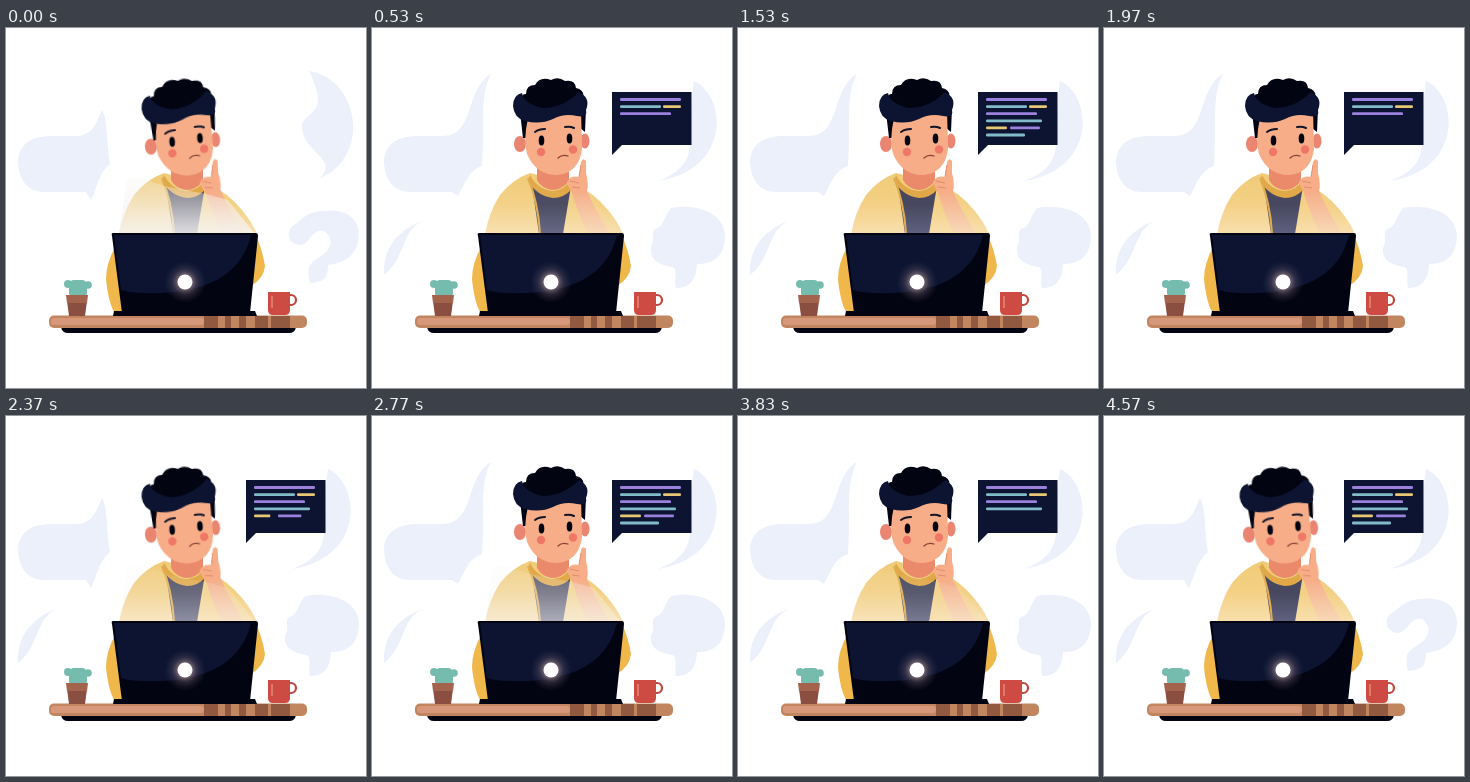
An HTML page for the animation above (4.76 s loop, 360 px wide and 360 px high).

```html
<!DOCTYPE html>
<html lang="en">
<head>
<meta charset="utf-8">
<title>Thinking at the laptop</title>
<style>
html, body { margin: 0; width: 100%; height: 100%; overflow: hidden; background: #fff; }
svg { display: block; width: 100vw; height: 100vh; }
.cloud { fill: #ecf0fa; }
.dark { fill: #030412; }
.navy { fill: #0c1431; }
.skin { fill: #f7ae88; }
.line { fill: none; stroke: #12142a; stroke-linecap: round; }
#head { transform-origin: 185px 147px; }
#hand { transform-origin: 208px 160px; }
#eyes { transform-origin: 183px 112px; }
#bubble { transform-origin: 241px 126px; }
</style>
</head>
<body>
<svg viewBox="0 0 360 360">
  <defs>
    <linearGradient id="coat" x1="0" y1="0" x2="0" y2="1">
      <stop offset="0" stop-color="#f0cb78"/>
      <stop offset=".5" stop-color="#f3d084"/>
      <stop offset="1" stop-color="#f8dfae"/>
    </linearGradient>
    <linearGradient id="shirt" x1="0" y1="0" x2="0" y2="1">
      <stop offset=".4" stop-color="#47485f"/>
      <stop offset="1" stop-color="#5f6280"/>
    </linearGradient>
    <linearGradient id="arm" x1="0" y1="0" x2="0" y2="1">
      <stop offset="0" stop-color="#f5ab86"/>
      <stop offset="1" stop-color="#f8d9b8"/>
    </linearGradient>
    <linearGradient id="fade" x1="0" y1="0" x2="0" y2="1">
      <stop offset="0" stop-color="#f4f2ef" stop-opacity=".25"/>
      <stop offset="1" stop-color="#f6f4f1" stop-opacity=".85"/>
    </linearGradient>
    <radialGradient id="glow">
      <stop offset=".3" stop-color="#b59a9c" stop-opacity=".7"/>
      <stop offset=".6" stop-color="#5f5263" stop-opacity=".4"/>
      <stop offset="1" stop-color="#39364f" stop-opacity="0"/>
    </radialGradient>
  </defs>

  <g class="cloud">
    <path id="talk"/>
    <path id="moon"/>
    <path id="query"/>
    <path id="leaf" d="M50 193C28 205 34 230 12 247C11 225 20 205 50 193Z"/>
  </g>

  <!-- body -->
  <path fill="#f0b74a" d="M109 219Q100 236 100 251Q102 273 108 284H118L114 219ZM248 204Q256 219 259 238Q258 250 245 258Z"/>
  <path fill="url(#coat)" d="M113 206Q117 184 128 167Q141 151 158 145L202 156Q221 164 236 182Q246 194 251 206Z"/>
  <path fill="url(#shirt)" d="M160 157Q180 174 199 158L191 206H167Z"/>
  <path fill="#e0a848" d="M158 147Q166 162 181 163Q193 162 199 152L200 161Q192 170 181 170Q165 168 156 153Z"/>
  <path fill="none" stroke="#e2ac50" stroke-width="2" d="M156 150Q166 174 168 205"/>
  <path fill="#ea8a6b" d="M165 136H197V153Q190 162 180 162Q169 160 165 152Z"/>
  <path fill="url(#arm)" d="M199 162L214 161Q222 180 238 206H216Q206 186 199 162Z"/>
  <path id="haze" fill="url(#fade)" d="M113 206L121 152Q131 146 141 152L158 158L200 166L222 172L249 206Z"/>

  <g id="head">
    <g fill="#e98570">
      <ellipse cx="148" cy="116" rx="6" ry="8"/>
      <ellipse cx="213" cy="113" rx="4.500" ry="7.500"/>
    </g>
    <path class="dark" d="M148 84H168L157 100L156 110H151ZM200 80H214L213 104L208 100Z"/>
    <path class="skin" d="M156 90Q151 113 155 126Q164 147 185 147Q207 145 210 121L209 82Z"/>
    <g fill="#ee7767"><circle cx="169" cy="124" r="4.200"/><circle cx="201" cy="121.500" r="4.200"/></g>
    <g id="eyes" class="dark"><ellipse cx="169.500" cy="112.500" rx="2.800" ry="5"/><ellipse cx="197.500" cy="110.500" rx="2.800" ry="5"/></g>
    <path class="line" stroke-width="2" d="M163 104Q167 101 173 101M193 99Q198 98 202 100"/>
    <path class="line" stroke-width="1.300" style="stroke:#8a4038" d="M186 130Q190 126 196 128"/>
    <path class="dark" d="M152 82Q146 66 154 66Q154 57 163 57Q168 48 179 52Q186 48 193 53
      Q203 51 204 60Q213 62 211 70Q216 75 213 82Z"/>
    <path class="navy" d="M150 65Q152 76 171 80Q191 80 207 64Q219 70 214 82Q216 90 205 88
      Q192 85 181 91Q168 97 153 93Q142 90 141 78Q141 67 150 65Z"/>
  </g>

  <g id="hand">
    <path class="skin" d="M195 154Q199 147 207 149L209 134Q211 129 214 133L214 145Q217 156 215 163Q207 168 200 164Q196 159 195 154Z"/>
    <path fill="none" stroke="#e08d6c" d="M198 153L207 155M200 159L208 160M207 149L209 137"/>
  </g>

  <!-- desk -->
  <path class="dark" d="M55 299H290Q289 305 283 305H62Q56 305 55 299Z"/>
  <rect x="43" y="287.500" width="258" height="12.500" rx="5" fill="#c1865f"/>
  <rect x="45" y="290" width="153" height="7" rx="3" fill="#d6977a"/>
  <path fill="#91593f" d="M198 288H212V300H198ZM219 288H225V300H219ZM233 288H240V300H233ZM249 288H262V300H249ZM265 288H284V300H265Z"/>

  <!-- cactus -->
  <g fill="#76bcae">
    <rect x="63" y="252" width="18" height="18" rx="5"/>
    <circle cx="62" cy="256" r="4"/><circle cx="82" cy="257" r="3.800"/>
  </g>
  <path fill="#8a4f40" d="M61 273H81L79 288H63Z"/>
  <path fill="#a3634c" d="M60 267H82L81 275H61Z"/>

  <!-- cup -->
  <circle cx="285" cy="272" r="5" fill="none" stroke="#c2453b" stroke-width="2.200"/>
  <path fill="#cd4b42" d="M262 264H284V282Q284 287 279 287H267Q262 287 262 282Z"/>
  <path fill="none" stroke="#e07a68" stroke-width="2" d="M266 268V280"/>

  <!-- laptop -->
  <path class="dark" d="M107 205H250Q252 205 252 208L244 285H116L106 208Q105 205 107 205Z"/>
  <path class="navy" d="M108 207H245Q232 262 154 265Q128 266 115 262Z"/>
  <path class="dark" d="M108 283H249L251 288H107Z"/>
  <circle cx="179" cy="254" r="21" fill="url(#glow)"/>
  <circle cx="179" cy="254" r="7.500" fill="#fff"/>

  <g id="bubble">
    <path class="navy" d="M240 64H319.500V117H250L240 127Z"/>
    <g id="rows"></g>
  </g>
</svg>

<script>
const LOOP = 4760, CYCLE = LOOP / 3, SWAY = LOOP / 4;
const $ = id => document.getElementById(id);

// Steps are [part of the duration, value, easing]
const play = (el, prop, duration, steps) => el.animate(
  steps.map(([offset, value, easing = 'ease-in-out']) => ({ offset, [prop]: value, easing })),
  { duration, iterations: Infinity });

// Rock between two held poses
const sway = (id, prop, left, right) => play($(id), prop, SWAY,
  [[0, left], [.2, right], [.67, right], [.84, left], [1, left]]);

const path = d => `path("${d}")`;
const talk = finger => path('M80 164H38C22 164 12 152 12 132C14 114 28 108 46 108H70' + finger + 'L80 164Z');

sway('head', 'transform', 'translate(-1.2px, 0.3px) rotate(-3.6deg)', 'none');
sway('hand', 'transform', 'translate(-1px, 0px) rotate(-3deg)', 'none');
sway('talk', 'd',
  talk('C88 108 91 92 96 82C102 92 100 112 104 136C92 146 92 158 85 172'),
  talk('C104 108 92 62 119 46C107 66 113 100 110 138C96 142 92 158 86 168'));

// The right-hand clouds start as a crescent and a question mark
const moonRest = path('M322 53C355 68 359 142 286 153C303 147 318 136 318 115C320 90 319 70 322 53Z');
play($('moon'), 'd', LOOP, [
  [0, path('M303 43C352 50 367 128 313 151C335 130 295 125 296 97C300 82 325 88 303 43Z')],
  [.1, moonRest], [1, moonRest]]);

const mark = path('M316 183C340 180 353 190 353 207C352 228 338 235 322 237C322 250 318 254 304 255C300 238 304 236 312 230C327 222 328 210 318 203C306 200 304 216 294 217C277 214 284 195 316 183Z');
const puff = path('M299 180C320 176 352 182 353 208C352 232 338 236 325 236C324 250 320 260 304 260C302 250 306 240 300 239C286 236 278 232 279 220C284 210 278 206 283 201C292 199 291 190 299 180Z');
// Both shapes need the same number of curves to blend
const blendable = mark.replace('C277 214 284 195 316 183', 'C282 217 279 202 288 197C296 192 300 184 316 183');
play($('query'), 'd', LOOP, [[0, blendable], [.1, puff], [.87, puff], [.96, blendable], [1, blendable]]);

play($('leaf'), 'opacity', LOOP, [[0, 0, 'step-end'], [30 / LOOP, 1], [1, 1]]);
play($('haze'), 'opacity', CYCLE, [[0, 1], [.23, 0], [.7, .6], [.76, .6], [.87, 0], [1, 0]]);
play($('eyes'), 'transform', LOOP, [[0, 'none'], [.21, 'none'], [.222, 'scaleY(.14)'], [.235, 'scaleY(.14)'], [.247, 'none'], [1, 'none']]);
play($('bubble'), 'transform', CYCLE, [[0, 'scale(0)', 'step-end'], [30 / CYCLE, 'scale(.2)', 'ease-out'], [.1, 'none'], [1, 'none']]);

// Code rows: colour, left and right of each piece
const tint = { p: '#9c80de', t: '#82bccb', y: '#e8c774' };
const rows = [
  [['p', 248, 309]],
  [['t', 248, 289], ['y', 291, 309]],
  [['p', 248, 299]],
  [['t', 248, 304]],
  [['y', 248, 269], ['p', 272, 302]],
  [['t', 248, 287]]
];
rows.forEach((pieces, i) => {
  const y = 71.5 + 7.1 * i;
  const start = Math.max(30, 210 * i - 95);
  for (const [ink, left, right] of pieces) {
    const bar = document.createElementNS('http://www.w3.org/2000/svg', 'rect');
    const box = { x: left, y: y - 1.4, width: right - left, height: 2.8, rx: 1.2, fill: tint[ink] };
    for (const key in box) bar.setAttribute(key, box[key]);
    bar.style.transformOrigin = `${left}px ${y}px`;
    $('rows').append(bar);
    play(bar, 'transform', CYCLE, [
      [0, 'scaleX(0)'], [start / CYCLE, 'scaleX(0)', 'linear'], [(start + 50) / CYCLE, 'none'], [1, 'none']]);
  }
});
</script>
</body>
</html>
```
